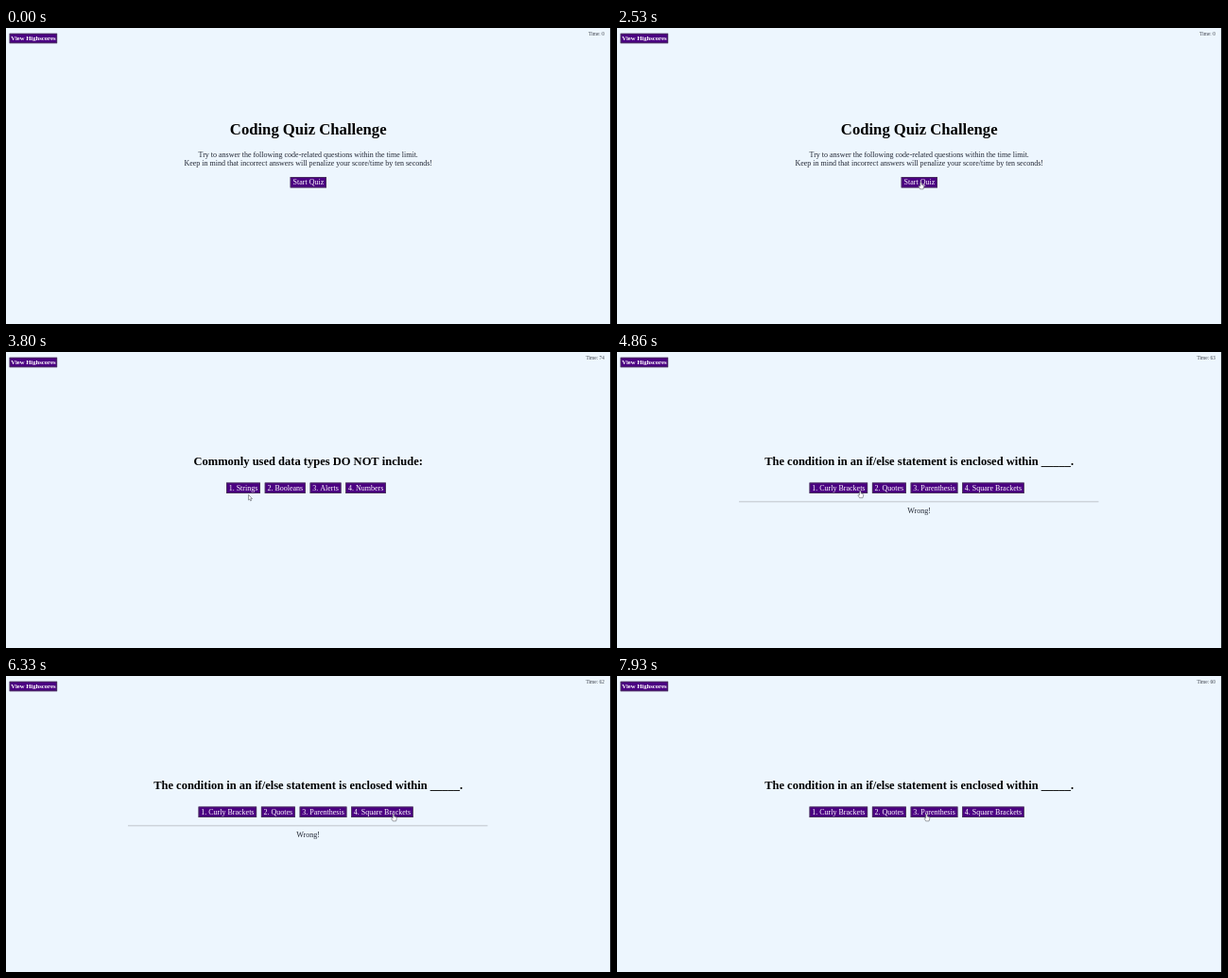
These frames come from a looping animation (640 px wide and 314 px high, 8000 ms). An HTML page with a canvas:

```html
<!DOCTYPE html>
<html lang="en">
<head>
<meta charset="utf-8">
<title>Quiz</title>
<style>
  html, body { margin: 0; width: 100%; height: 100%; overflow: hidden; background: #edf6fe; }
  canvas { display: block; width: 640px; height: 314px; }
</style>
</head>
<body>
<canvas id="stage"></canvas>
<script>
const LOOP = 8000;
const SERIF = '"Liberation Serif", "Times New Roman", serif';
const START = 2600, ANSWER = 4790, FEEDBACK_END = 6950;

const canvas = document.getElementById('stage');
const ctx = canvas.getContext('2d');
const ratio = window.devicePixelRatio || 1;
canvas.width = 640 * ratio;
canvas.height = 314 * ratio;

const questions = [
  { x: 233, text: 'Commonly used data types DO NOT include:',
    options: ['1. Strings', '2. Booleans', '3. Alerts', '4. Numbers'] },
  { x: 203.6, text: 'The condition in an if/else statement is enclosed within _____.',
    options: ['1. Curly Brackets', '2. Quotes', '3. Parenthesis', '4. Square Brackets'] }
];

// [time, remaining seconds]
const clock = [[0, 0], [START, 75], [3600, 74], [4600, 73], [ANSWER, 63], [5650, 62], [6560, 61], [7790, 60]];

// Pointer hotspot: [time, x, y]
const path = [
  [730, 508, 112], [1060, 468, 119], [1230, 468, 119], [1400, 456, 123],
  [1700, 396, 152], [2060, 326, 175], [2130, 324, 173], [2400, 321.5, 163.5],
  [3230, 321.5, 163.5], [3500, 288, 158], [3800, 256.5, 151.5], [4200, 253, 147],
  [4790, 253, 147], [5000, 266, 148], [5260, 291, 146.5], [5600, 303, 154],
  [5850, 344, 179], [6100, 388, 164], [6330, 410, 146.5], [6600, 411, 146.5],
  [6930, 411, 146.5], [7300, 366, 150], [7730, 329, 146.5], [7930, 327.5, 146.5]
];

function label(text, x, y, size, { align = 'center', color = '#222733', weight = '' } = {}) {
  ctx.font = `${weight} ${size}px ${SERIF}`;
  ctx.textAlign = align;
  ctx.fillStyle = color;
  ctx.fillText(text, x, y);
}

function button(text, x, y, w, h, size, baseline, weight) {
  ctx.fillStyle = '#4b0082';
  ctx.fillRect(x, y, w, h);
  ctx.lineWidth = 0.7;
  ctx.strokeStyle = '#46404f';
  ctx.strokeRect(x + 0.35, y + 0.35, w - 0.7, h - 0.7);
  label(text, x + w / 2, baseline, size, { color: '#fff', weight });
  return { x, y, w, h };
}

function startScreen() {
  label('Coding Quiz Challenge', 319.7, 113, 16.67, { color: '#000', weight: 'bold' });
  label('Try to answer the following code-related questions within the time limit.', 319.7, 137.2, 8);
  label('Keep in mind that incorrect answers will penalize your score/time by ten seconds!', 319.7, 146.3, 8);
  return [button('Start Quiz', 300.7, 158, 38.3, 11.4, 8, 166.2)];
}

function questionScreen({ x, text, options }) {
  label(text, 319.7, 120.3, 12.5, { color: '#000', weight: 'bold' });
  ctx.font = `8px ${SERIF}`;
  const widths = options.map(option => ctx.measureText(option).width + 5.3);
  return options.map((option, i) => {
    const box = button(option, x, 138.6, widths[i], 11.4, 8, 146.8);
    x += widths[i] + 4.8;
    return box;
  });
}

function feedback() {
  ctx.fillStyle = '#b9bfc5';
  ctx.fillRect(129, 158.4, 380.5, 0.9);
  label('Wrong!', 319.6, 170.8, 8.1);
}

function pointerAt(t) {
  if (t < path[0][0]) return null;
  const next = path.findIndex(p => p[0] > t);
  if (next < 0) return path[path.length - 1].slice(1);
  const [t0, x0, y0] = path[next - 1];
  const [t1, x1, y1] = path[next];
  const k = (t - t0) / (t1 - t0);
  return [x0 + (x1 - x0) * k, y0 + (y1 - y0) * k];
}

const arrow = new Path2D('M0 0V5.6L1.3 4.5L2.2 6.5L3.1 6.1L2.3 4.1H4Z');
const hand = new Path2D('M-.8 .4Q0-.5 .7 .4V2.6L2.9 3.2Q3.5 3.5 3.3 4.6L2.6 7.4H-.8L-2.5 4.6Q-2.4 3.6-.8 4.4Z');

function drawPointer([x, y], boxes) {
  const over = boxes.some(b => x >= b.x && x <= b.x + b.w && y >= b.y && y <= b.y + b.h);
  const shape = over ? hand : arrow;
  ctx.save();
  ctx.translate(x, y);
  ctx.fillStyle = '#fff';
  ctx.strokeStyle = '#5b5f68';
  ctx.lineWidth = 0.6;
  ctx.fill(shape);
  ctx.stroke(shape);
  ctx.restore();
}

function draw(t) {
  ctx.setTransform(ratio, 0, 0, ratio, 0, 0);
  ctx.fillStyle = '#edf6fe';
  ctx.fillRect(0, 0, 640, 314);
  ctx.fillStyle = '#23262b';
  ctx.fillRect(639, 0, 1, 314);

  const boxes = [button('View Highscores', 3.7, 5.8, 50.4, 10.4, 6.67, 13.2, 'bold')];
  const seconds = clock.filter(c => c[0] <= t).pop()[1];
  label(`Time: ${seconds}`, 632.8, 7.5, 5.35, { align: 'right', color: '#3a3f48' });

  if (t < START) boxes.push(...startScreen());
  else boxes.push(...questionScreen(questions[t < ANSWER ? 0 : 1]));
  if (t >= ANSWER && t < FEEDBACK_END) feedback();

  const pointer = pointerAt(t);
  if (pointer) drawPointer(pointer, boxes);
}

const origin = performance.now();
function frame() {
  draw((performance.now() - origin) % LOOP);
  requestAnimationFrame(frame);
}
frame();
</script>
</body>
</html>
```
